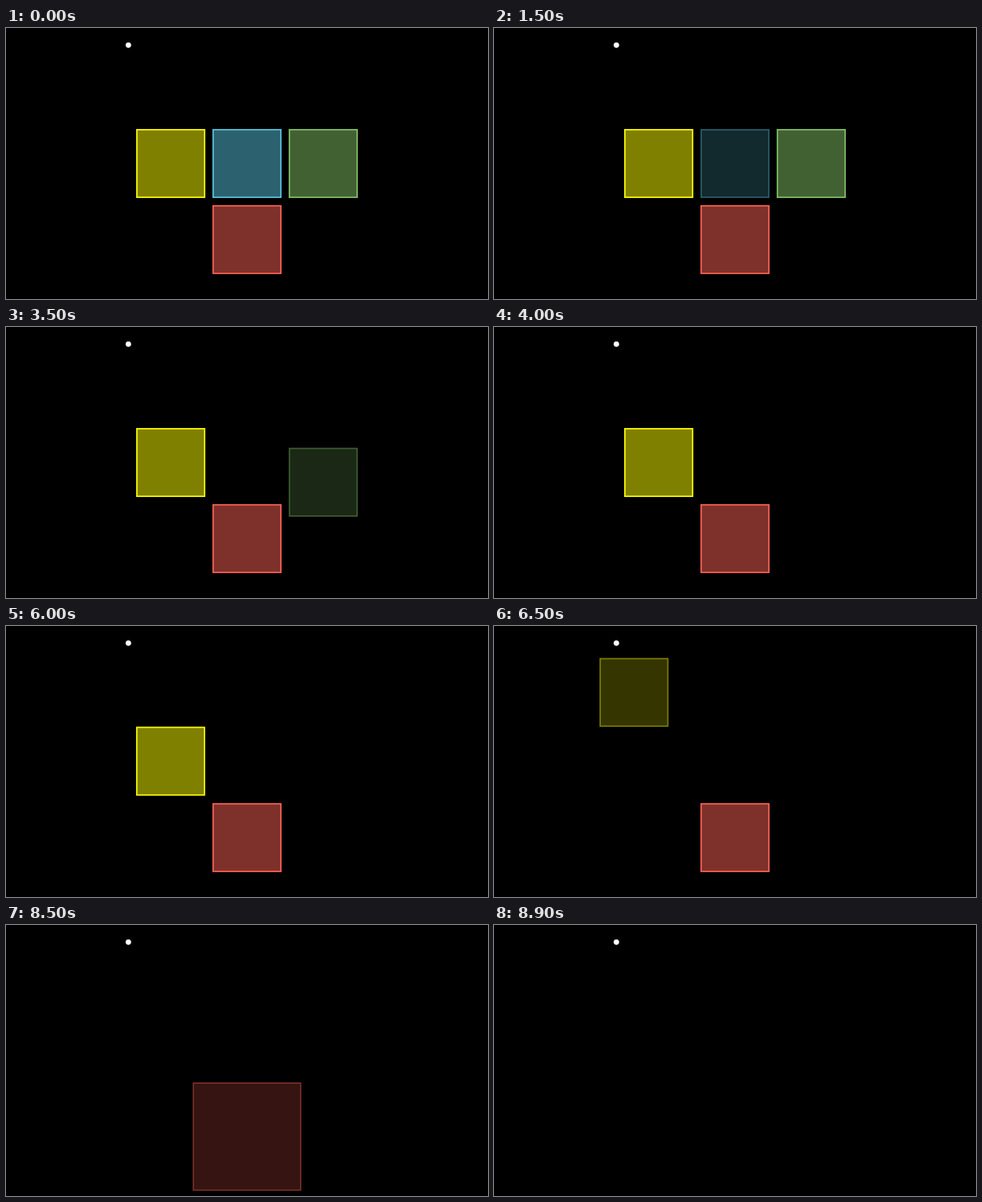
Recreate the animation shown at these times as an HTML page with a canvas. Size 600 by 338 pixels, loop 10000 ms.

```html
<!DOCTYPE html>
<html>
<head>
<meta charset="utf-8">
<style>
  html, body { margin: 0; height: 100%; background: #000; overflow: hidden; }
  canvas { display: block; }
</style>
</head>
<body>
<canvas id="stage" width="600" height="338"></canvas>
<script>
const ctx = document.getElementById('stage').getContext('2d');
const UNIT = 600 * 9 / 128; // pixels per scene unit, 8 units high
const LOOP = 10000, STEP = 100, LEAD = 1 / 30;

// Positions in scene units, y up; each square fades for one second from `start`.
const dot = { x: -3.5, y: 3.5 };
const squares = [
  { color: '#58c4dd', x: 0, y: 0, start: 1000 },
  { color: '#83c167', x: 2.25, y: 0, start: 3000, dy: -1 },
  { color: '#ffff00', x: -2.25, y: 0, start: 6000, dx: dot.x + 2.25, dy: dot.y },
  { color: '#fc6255', x: 0, y: -2.25, start: 8000, grow: 1 },
];

const toX = x => 300 + x * UNIT;
const toY = y => 169 - y * UNIT;
const sigmoid = x => 1 / (1 + Math.exp(-x));

function smooth(t) {
  const edge = sigmoid(-5);
  return (sigmoid(10 * (t - 0.5)) - edge) / (1 - 2 * edge);
}

function progress(time, start) {
  if (time < start) return 0;
  return smooth(Math.min(1, (time - start) / 1000 + LEAD));
}

function drawSquare({ color, x, y, start, dx = 0, dy = 0, grow = 0 }, time) {
  const p = progress(time, start);
  const opacity = 1 - p;
  if (opacity < 0.035) return;
  const half = UNIT * (1 + grow * p);
  const box = [toX(x + dx * p) - half, toY(y + dy * p) - half, 2 * half, 2 * half];
  ctx.fillStyle = ctx.strokeStyle = color;
  ctx.lineWidth = 0.04 * UNIT;
  ctx.globalAlpha = opacity / 2;
  ctx.fillRect(...box);
  ctx.globalAlpha = opacity;
  ctx.strokeRect(...box);
}

function draw(now) {
  const time = Math.floor(now % LOOP / STEP) * STEP;
  ctx.globalAlpha = 1;
  ctx.fillStyle = '#000';
  ctx.fillRect(0, 0, 600, 338);
  ctx.fillStyle = '#fff';
  ctx.beginPath();
  ctx.arc(toX(dot.x), toY(dot.y), 0.08 * UNIT, 0, 2 * Math.PI);
  ctx.fill();
  for (const square of squares) drawSquare(square, time);
}

let origin;
function tick(now) {
  origin ??= now;
  draw(now - origin);
  requestAnimationFrame(tick);
}
draw(0);
requestAnimationFrame(tick);
</script>
</body>
</html>
```
